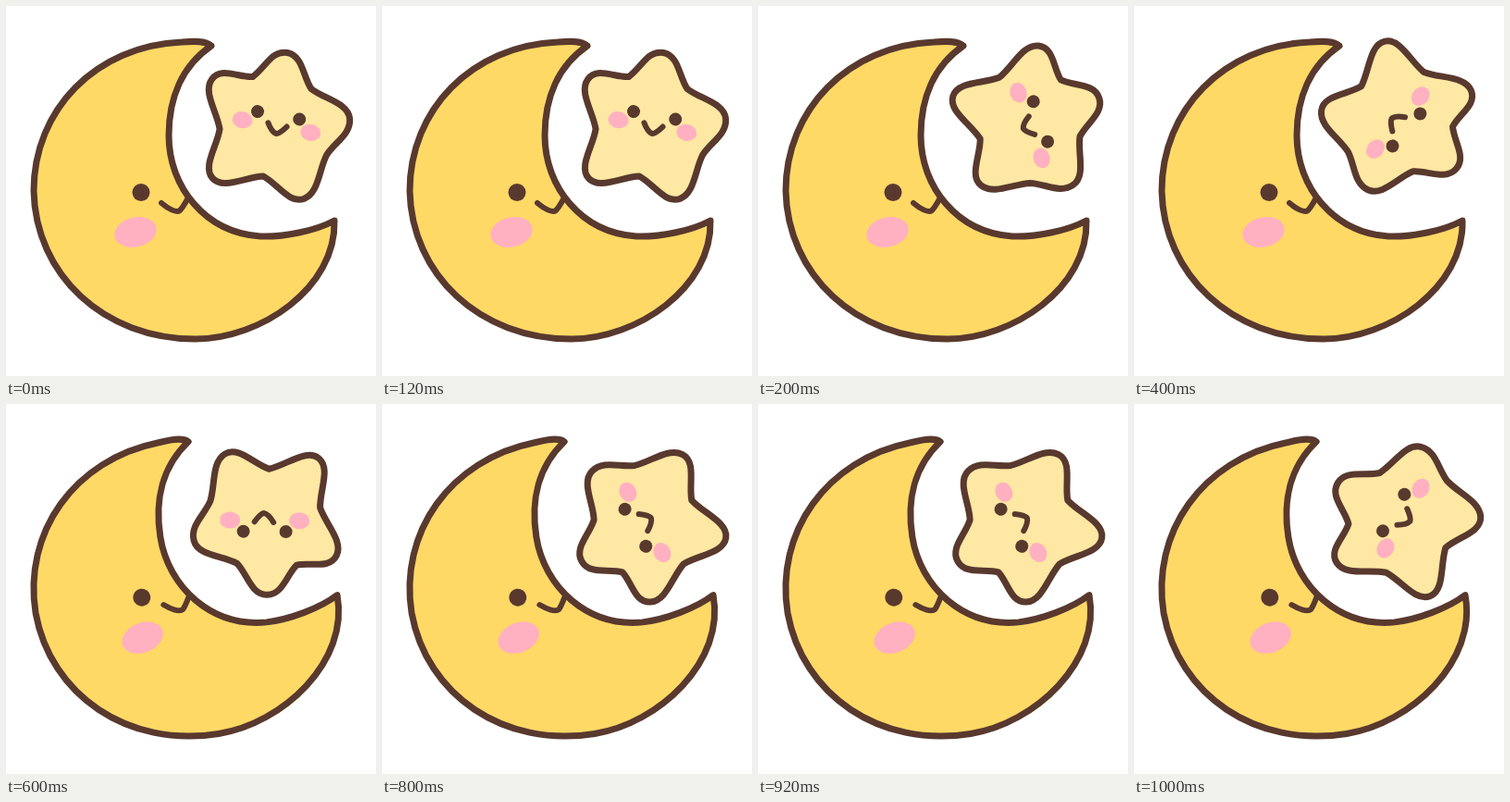
These frames come from a looping animation (400x400 px, 1200 ms). An HTML page:

```html
<!DOCTYPE html>
<html lang="en">
<head>
<meta charset="utf-8">
<title>Moon and star</title>
<style>
  html, body { margin: 0; width: 100%; height: 100%; overflow: hidden; background: #fff; }
  svg { display: block; width: 100%; height: 100%; }
  path { stroke: #59392e; stroke-width: 7; stroke-linecap: round; stroke-linejoin: round; }
  .moon { fill: #ffd966; }
  .star { fill: #ffe8a3; }
  .smile { fill: none; stroke-width: 6; }
  .eye { fill: #59392e; }
  .cheek { fill: #ffb0c1; }
</style>
</head>
<body>
<svg viewBox="0 0 400 400">
  <g id="moon">
    <path class="moon" d="M222 43C216 37 202 38 190 39C97 43 30 112 30 200C32 290 105 360 205 360C275 360 357 305 355 232C335 243 300 250 275 249C215 245 176 195 176 140C176 100 190 65 222 43Z"/>
    <ellipse class="cheek" cx="140" cy="244.5" rx="23" ry="16" transform="rotate(-13 140 244.5)"/>
    <circle class="eye" cx="146" cy="201.5" r="9.5"/>
    <path class="smile" d="M168 213C175 219 184 224 188 221Q191 218 196 209"/>
  </g>
  <g id="star">
    <path class="star" id="body"/>
    <g transform="translate(5.7 -10.8) rotate(10.5)">
      <ellipse class="cheek" cx="-37.5" cy="12" rx="11" ry="9"/>
      <ellipse class="cheek" cx="37.5" cy="12" rx="11" ry="9"/>
      <circle class="eye" cx="-23" r="7"/>
      <circle class="eye" cx="23" r="7"/>
      <path class="smile" d="M-9.5 10Q-4 19 1 20Q5 19 11 10.5"/>
    </g>
  </g>
</svg>
<script>
  const STEP = 200, FRAMES = 6, HALF = FRAMES / 2;
  const get = id => document.getElementById(id);
  const polar = (deg, r) => {
    const a = deg * Math.PI / 180;
    return [r * Math.cos(a), r * Math.sin(a)];
  };
  const mix = (p, q, k) => p.map((v, i) => v + (q[i] - v) * k);

  // Each arm: tip angle, tip radius, radius of the notch after it
  const arms = [[-79, 80, 57], [-5, 83, 66], [67, 86, 56], [139, 87, 58], [217, 83, 57]];

  function starPath() {
    const tips = arms.map(([angle, r]) => polar(angle, r));
    const notches = arms.map(([angle, , r], i) => {
      const next = i < 4 ? arms[i + 1][0] : arms[0][0] + 360;
      return polar((angle + next) / 2 - 2, r);
    });
    let d = 'M' + notches[4];
    arms.forEach(([angle], i) => {
      const tip = tips[i], from = notches[(i + 4) % 5], to = notches[i];
      const [dx, dy] = polar(angle + 90, 17);
      d += `C${mix(from, tip, 0.35)} ${tip[0] - dx} ${tip[1] - dy} ${tip}`;
      d += `C${tip[0] + dx} ${tip[1] + dy} ${mix(to, tip, 0.35)} ${to}`;
    });
    return d + 'Z';
  }

  // The scene tips over in the second half; the star turns and wobbles on its spot
  function draw(now) {
    const i = Math.floor(now / STEP) % FRAMES;
    const tipped = i >= HALF;
    const tilt = tipped ? -10 : 0;
    const [x, y] = tipped ? [286, 128] : [290, 126];
    const [dx, dy] = polar((tipped ? 213 : 110) - 120 * i, 3.2);
    get('moon').setAttribute('transform', `rotate(${tilt * 0.9} 195 200)`);
    get('star').setAttribute('transform',
      `translate(${x + dx} ${y + dy}) rotate(${i * 360 / FRAMES + tilt})`);
  }

  let start;
  function tick(now) {
    start ??= now;
    draw(now - start);
    requestAnimationFrame(tick);
  }
  get('body').setAttribute('d', starPath());
  draw(0);
  requestAnimationFrame(tick);
</script>
</body>
</html>
```
